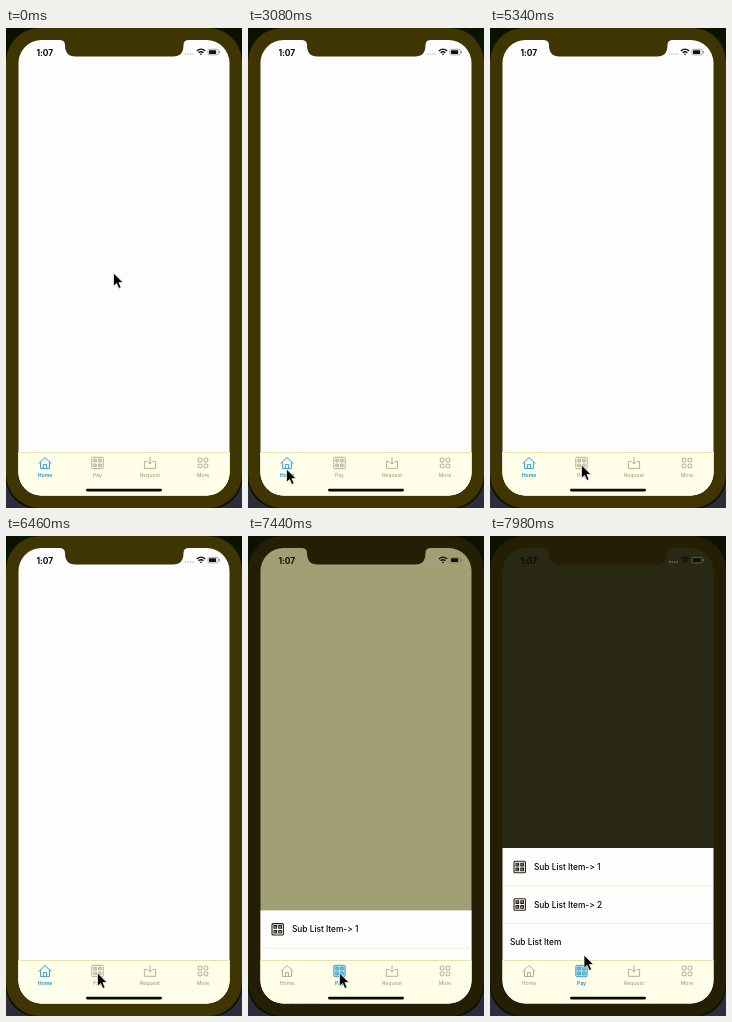
An HTML page for the animation above (8 s loop, 236x480 px).

```html
<!DOCTYPE html>
<html lang="en">
<head>
<meta charset="utf-8">
<title>Tab bar with sub list</title>
<style>
  html, body { margin: 0; width: 100%; height: 100%; overflow: hidden; background: #0b1200; }
  svg { display: block; width: 100%; height: 100%; }
  text { font-family: Inter, Roboto, sans-serif; font-variant-ligatures: none; font-feature-settings: "calt" 0; }
  .tab { fill: none; stroke: #aaa98a; stroke-width: .9; }
  .tab text { fill: #96957a; stroke: none; font-size: 5.2px; text-anchor: middle; }
  .tab.active { fill: #a9dcef; stroke: #3a9bc5; }
  #tab-home.active { fill: #e2f3f4; }
  .tab.active text { fill: #238fbd; font-weight: 600; }
  .row text { font-size: 8.3px; font-weight: 500; fill: #050500; }
  .row use { fill: none; stroke: #221f12; stroke-width: 1.1; }
</style>
</head>
<body>
<svg viewBox="0 0 236 480">
  <defs>
    <clipPath id="screen"><rect x="12.5" y="12" width="211" height="455.5" rx="23"/></clipPath>
    <g id="home"><path d="M-6.5 .5 0-5.5 6.5 .5M-4.5-1V5.5H4.5V-1M-1.5 5.5V1.5H1.5V5.5"/></g>
    <g id="pay">
      <rect x="-5.7" y="-5.7" width="11.4" height="11.4" rx="1"/>
      <path d="M-3.7-3.7h2.6v2.6h-2.6zM1.1-3.7h2.6v2.6H1.1zM-3.7 1.1h2.6v2.6h-2.6zM1.1 1.1h2.6v2.6H1.1z"/>
      <path d="M-2.9-2.4h1M1.9-2.4h1M-2.9 2.4h1M1.9 2.4h1"/>
    </g>
    <g id="request"><path d="M-2.5-1.5H-5.6V5.3H5.6V-1.5H2.5M0-5.8V1M-1.7-.7 0 1 1.7-.7"/></g>
    <g id="more">
      <rect x="-4.8" y="-4.8" width="3.7" height="3.7" rx=".8"/>
      <rect x="1.1" y="-4.8" width="3.7" height="3.7" rx=".8"/>
      <rect x="-4.8" y="1.1" width="3.7" height="3.7" rx=".8"/>
      <rect x="1.1" y="1.1" width="3.7" height="3.7" rx=".8"/>
    </g>
  </defs>

  <path d="M0 455Q5 475 24 480H0ZM236 455Q231 475 212 480H236Z" fill="#2c2c3c"/>
  <rect class="bezel" width="236" height="480" rx="34"/>

  <g clip-path="url(#screen)">
    <rect id="page" width="236" height="480"/>
    <text x="30.4" y="27.5" font-size="8.4" font-weight="700" fill="#0c0b05">1:07</text>
    <path d="M179 26h9" stroke="#aaa98a" stroke-dasharray="1.3 1.2"/>
    <g fill="none" stroke="#11100a" stroke-width="1.3">
      <path d="M190.8 23Q195 19.3 199.2 23M192.6 24.8Q195 22.7 197.4 24.8"/>
      <path d="M194.2 26.4h1.6"/>
      <rect x="202" y="21.3" width="10.4" height="5.6" rx="1.5" stroke="#77765f" stroke-width=".6"/>
    </g>
    <rect x="203" y="22.3" width="7.2" height="3.6" rx=".7" fill="#11100a"/>
    <path d="M213.4 23v2.2" stroke="#77765f" stroke-width=".8"/>
    <g id="sheet">
      <rect x="12" width="212" height="170" fill="#fdfdfe"/>
    </g>
    <rect x="12" y="424" width="212" height="44" fill="#fffee9"/>
    <path d="M12 424.5H224" stroke="#e3e0a6" stroke-width=".9"/>
    <g id="tabs"></g>
    <rect x="80" y="460.7" width="76" height="2.7" rx="1.35" fill="#080805"/>
  </g>
  <path class="bezel" d="M53 10V12Q59 12 59 17Q59 28.5 69.5 28.5H167Q177.5 28.5 177.5 17Q177.5 12 183 12V10Z"/>

  <path id="cursor" d="M.5 0V13.2L3.6 10.4 5.8 15.4 8.1 14.4 5.9 9.6H10.1Z"
        fill="#050505" stroke="#fffef0" stroke-width=".7"/>
</svg>
<script>
const LOOP = 8000, SELECT = 7240, SLIDE = 435;
const ROW = 37.5, SHEET_CLOSED = 424, SHEET_OPEN = 312;
const find = id => document.getElementById(id);
const bezels = document.querySelectorAll('.bezel');

const tabs = [['home', 'Home', 39], ['pay', 'Pay', 91.5], ['request', 'Request', 144], ['more', 'More', 197]];
find('tabs').innerHTML = tabs.map(([icon, label, x]) =>
  `<g class="tab" id="tab-${icon}" transform="translate(${x} 435)">
     <use href="#${icon}"/><text y="13.5">${label}</text></g>`).join('');

const rows = ['Sub List Item-> 1', 'Sub List Item-> 2', 'Sub List Item'];
find('sheet').innerHTML += rows.map((label, i) => {
  const hasIcon = i < 2;
  return `<g class="row" transform="translate(0 ${i * ROW})">
    ${hasIcon ? '<use href="#pay" x="29.7" y="19"/>' : ''}
    <text x="${hasIcon ? 44 : 20}" y="22">${label}</text>
    ${i ? '<path d="M12 .5H224" stroke="#f3f0c8" stroke-width=".8"/>' : ''}</g>`;
}).join('');

// Cursor stops: time, x, y
const path = [
  [0, 107, 245], [400, 107, 245], [1500, 38, 441], [3600, 38, 441],
  [4320, 82, 439], [4700, 91, 437], [7580, 91, 437], [7980, 93.5, 419], [LOOP, 93.5, 419]
];
const mix = (a, b, p) => a + (b - a) * p;
const ease = p => p * p * (3 - 2 * p);

function cursorAt(t) {
  const i = path.findIndex(stop => stop[0] > t);
  const [t0, x0, y0] = path[i - 1], [t1, x1, y1] = path[i];
  const p = ease((t - t0) / (t1 - t0));
  return [mix(x0, x1, p), mix(y0, y1, p)];
}

function draw(now) {
  const t = now % LOOP;
  const selected = t >= SELECT;
  const p = ease(Math.min(1, Math.max(0, (t - SELECT) / SLIDE)));
  const lit = selected ? [254, 255, 230] : [253, 253, 254];
  const dim = [42, 41, 20];
  const falloff = [1, 1, .75]; // blue fades first, giving the olive tint
  const color = lit.map((c, i) => Math.round(mix(c, dim[i], p ** falloff[i])));

  find('page').setAttribute('fill', `rgb(${color})`);
  bezels.forEach(b => b.setAttribute('fill', selected ? '#241e04' : '#3e3502'));
  find('sheet').setAttribute('transform', `translate(0 ${mix(SHEET_CLOSED, SHEET_OPEN, p)})`);
  find('tab-home').classList.toggle('active', !selected);
  find('tab-pay').classList.toggle('active', selected);
  find('cursor').setAttribute('transform', `translate(${cursorAt(t)})`);
}

const start = performance.now();
function frame() {
  draw(performance.now() - start);
  requestAnimationFrame(frame);
}
frame();
</script>
</body>
</html>
```
